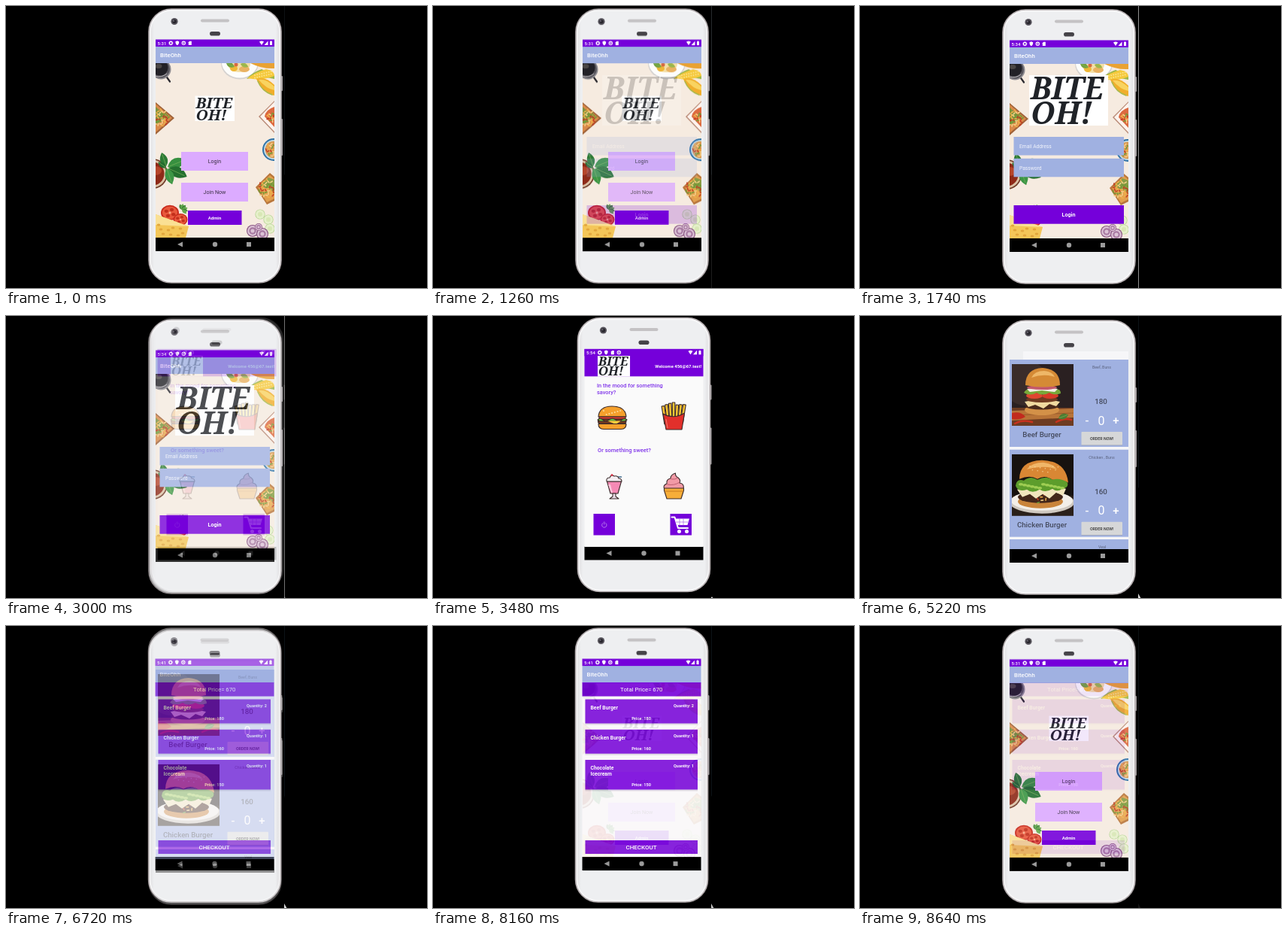
An HTML page that plays this animation: 560 by 375 pixels, repeating every 8.7 s.

```html
<!DOCTYPE html>
<html lang="en">
<head>
<meta charset="utf-8">
<title>Food ordering app</title>
<style>
  html, body { margin: 0; width: 100%; height: 100%; overflow: hidden; background: #000; }
  svg { display: block; width: 100vw; height: 100vh; }
  text { font-family: Roboto, sans-serif; white-space: pre; }
  .logo { font-family: "Noto Serif", serif; font-style: italic; font-weight: 700; }
</style>
</head>
<body>
<svg id="stage" viewBox="0 0 560 375">
  <defs>
    <clipPath id="screen"><rect x="199" y="76" width="158" height="232"/></clipPath>
    <clipPath id="photo"><rect width="82" height="82"/></clipPath>
    <clipPath id="mark"><rect width="105" height="67"/></clipPath>
    <linearGradient id="body" x2="1">
      <stop offset="0" stop-color="#dddcde"/><stop offset=".04" stop-color="#eeeff1"/>
      <stop offset=".96" stop-color="#eeeff1"/><stop offset="1" stop-color="#dad8da"/>
    </linearGradient>
  </defs>
</svg>
<script>
const PURPLE = '#7500da', BLUE = '#a0b1e1', CREAM = '#f6ebe0', INK = '#3a2a2a';
const HOLD = 1200, STEP = 60, STEPS = 10, SLOT = HOLD + STEP * (STEPS - 1);

const rect = (x, y, w, h, fill, extra = '') =>
  `<rect x="${x}" y="${y}" width="${w}" height="${h}" fill="${fill}" ${extra}/>`;
const oval = (x, y, rx, ry, fill, extra = '') =>
  `<ellipse cx="${x}" cy="${y}" rx="${rx}" ry="${ry}" fill="${fill}" ${extra}/>`;
const dot = (x, y, r, fill, extra) => oval(x, y, r, r, fill, extra);
const path = (d, fill, extra = '') => `<path d="${d}" fill="${fill}" ${extra}/>`;
const line = (d, color, w = 1) =>
  path(d, 'none', `stroke="${color}" stroke-width="${w}" stroke-linecap="round" stroke-linejoin="round"`);
const text = (s, x, y, size, fill, weight = 400, anchor = 'start') =>
  `<text x="${x}" y="${y}" font-size="${size}" fill="${fill}" font-weight="${weight}" text-anchor="${anchor}">${s}</text>`;
const mid = (s, x, y, size, fill, weight) => text(s, x, y, size, fill, weight, 'middle');
const at = (x, y, inner, scale = 1, extra = '') =>
  `<g transform="translate(${x} ${y}) scale(${scale})" ${extra}>${inner}</g>`;
const range = (n, f) => Array.from({ length: n }, (_, i) => f(i)).join('');

function phone(dx, dy) {
  return at(dx, dy,
    rect(365, 93, 3, 20, '#aaa6a8', 'rx="1"') + rect(365, 150, 3, 49, '#aaa6a8', 'rx="1"') +
    rect(190, 4, 176, 364, 'url(#body)', 'rx="30" stroke="#b5aeb0" stroke-width="1.6"') +
    rect(192, 6, 172, 360, 'none', 'rx="28" stroke="#f9f9fa" stroke-width="1.4"') +
    dot(224, 20.5, 4.6, '#55525a') + dot(224, 20.5, 2.6, '#26242b') + dot(223, 19.8, 1, '#73717c') +
    rect(259, 17.5, 38, 4, '#c4c2c4', 'rx="2"') +
    rect(271, 34, 14, 5.6, '#454348', 'rx="2.8"') +
    rect(199, 308, 158, 18, '#000') +
    path('M235 313.5V320.5L228 317Z', '#9b9b9b') + dot(278, 317, 3.2, '#9b9b9b') +
    rect(320, 314, 6, 6, '#9b9b9b'));
}

function status(x, y, time, swap) {
  const shield = path('M-2.4 -2L0 -3L2.4 -2Q2.4 2 0 3Q-2.4 2 -2.4 -2Z', '#fff');
  const ring = dot(0, 0, 2.2, 'none', 'stroke="#fff" stroke-width="1.1"') + dot(0, 0, .9, '#fff');
  const card = path('M-2 -1L-.6 -2.6H2V2.6H-2Z', '#fff');
  const gear = dot(0, 0, 1.9, 'none', 'stroke="#fff" stroke-width="1.3"') +
    dot(0, 0, 2.7, 'none', 'stroke="#fff" stroke-width=".7" stroke-dasharray="1.1 1"');
  const icons = swap ? [gear, shield, card, ring] : [gear, shield, ring, card];
  return at(x, y, rect(0, 0, 158, 9.5, PURPLE) + text(time, 2.5, 7, 6, '#fff', 500) +
    icons.map((s, i) => at(20.3 + i * 8.5, 4.8, s)).join('') +
    path('M138 3Q141 1 144 3L141 7.5Z', '#fff') + path('M149.5 2V7.5H144.5Z', '#fff') +
    rect(152, 2.5, 3, 5, '#fff') + rect(152.8, 1.8, 1.4, 1, '#fff'));
}

const titleBar = (x, y) => rect(x, y, 158, 22.5, BLUE) + text('BiteOhh', x + 6, y + 14, 7.8, '#fff', 500);

const logo = (x, y, scale) => at(x, y, rect(0, 0, 105, 67, '#fff') +
  `<g clip-path="url(#mark)" fill="#202328" font-size="41">
    <text class="logo" x="2" y="32">BITE</text><text class="logo" x="2" y="64.5">OH!</text></g>`, scale);

const leaf = (x, y, angle, len, color) =>
  `<g transform="translate(${x} ${y}) rotate(${angle})">` +
  path(`M0 0Q${len * .45} ${-len * .55} ${len} 0Q${len * .45} ${len * .5} 0 0Z`, color) +
  line(`M1 0H${len * .85}`, '#7db45c', .6) + '</g>';

// Scattered strands over a plate: green, red and yellow crumbs on a fixed spiral.
const crumbs = (x, y, r, n) => range(n, i => {
  const a = i * 2.4, d = r * Math.sqrt((i + .5) / n);
  return `<g transform="translate(${x + d * Math.cos(a)} ${y + d * Math.sin(a)}) rotate(${i * 57})">` +
    rect(-2, -.7, 4.2, 1.5, ['#f2b04a', '#c23a20', '#6f9a35', '#f7d48a'][i % 4], 'rx=".7"') + '</g>';
});

function food(dy) {
  const tomato = (x, y, r) => oval(x, y, r, r * .85, '#c92a1c') + oval(x, y, r * .84, r * .7, '#e8583c') +
    range(4, i => oval(x + r * .45 * Math.cos(i * 1.57 + .5), y + r * .38 * Math.sin(i * 1.57 + .5), r * .22, r * .18, '#c22f1b')) +
    dot(x, y, r * .12, '#f6b08c');
  const slice = (x, y) => dot(x, y, 6.6, '#b5d392') + dot(x, y, 5.9, '#e6f0cb') + dot(x, y, 3, '#d8e7b5');
  const onion = (x, y, r) => dot(x, y, r, '#8a5583') +
    range(3, i => dot(x, y, r * (.86 - i * .27), i % 2 ? '#a87aa2' : '#dcc3d6'));
  return at(0, dy,
    rect(199, 76, 158, 232, CREAM) +
    // coffee
    line('M212 92L218 100.5', '#2b2a30', 2.2) + dot(206, 84, 13.5, '#8d8b90') + dot(205.5, 83.5, 12.3, '#55535a') +
    dot(205, 82, 10.5, '#222127') + oval(203, 80, 4.5, 3, '#4a4645') + line('M198 93Q207 96 214 90', '#bdbabd', 1) +
    // breakfast plate and corn
    oval(311, 76, 25, 21.5, '#d5d2d0') + oval(311, 75, 24, 20.5, '#fdfdfb') + oval(310, 77, 15, 11, '#f4dfa6') +
    oval(303, 83, 5, 4, '#eeb737') + oval(317, 84, 7, 4, '#e9b263') + leaf(293, 76, 25, 12, '#74a13e') +
    leaf(312, 77, 20, 11, '#a5b84b') + dot(306, 78, 2.5, '#d66b42') +
    path('M320 97Q328 88 340 84L357 92V97Q338 92 320 97Z', '#9cb649') +
    path('M321 96Q334 87 346 84Q357 86 357 93Q340 100 321 96Z', '#f5c93c') +
    path('M333 97Q345 93 357 105V119Q341 116 333 97Z', '#f0ae2c') + path('M336 98Q345 96 357 107V112Q346 110 336 98Z', '#f9d360') +
    range(16, i => dot(331 + i % 8 * 3.1, 92 + (i / 8 | 0) * 3.4 - i % 8 * .7, 1, '#fbe28a')) +
    path('M325 76H357V83Q341 84 325 76Z', '#e9a233') + line('M335 100Q340 113 354 118', '#a8ba4e', 1.5) +
    // noodle boxes
    path('M199 128L224 149L199 171Z', '#a0633a') + path('M199 130L221 149L199 168Z', '#d98a4a') +
    path('M199 134L215 148L199 157Z', '#7f9440') + crumbs(206, 149, 11, 38) +
    path('M357 126L336 147L357 169Z', '#b98a76') + path('M357 127.5L338 147L357 167Z', '#fdf4ee') +
    path('M357 134Q345 138 344 147L357 161Z', '#dc6a40') + crumbs(353, 148, 6, 14) +
    path('M351 222L332 241L347 264L357 259V227Z', '#b9773c') + path('M351 225L335 241L347 261L357 256V230Z', '#e2a04e') +
    path('M349 228L338 239L357 247V231Z', '#8a9c45') + crumbs(347, 243, 12, 38) +
    // bowl
    dot(356, 191, 15, '#2f73a8') + dot(356, 191, 13, '#c4dce4') + dot(356, 191, 11.2, '#d99a55') + crumbs(354, 191, 9, 22) +
    // sauce and basil
    dot(195, 223, 20, '#6f3b28') + dot(195, 223, 18.4, '#dcc2a6') + dot(195, 223, 15.5, '#8e2a18') + oval(199, 219, 8, 6, '#b5452a') +
    line('M212 216L221 236', '#4f8a35', 1.2) + leaf(213, 213, -108, 19, '#2c7a35') + leaf(213, 215, -145, 13, '#236a2d') +
    leaf(215, 214, -22, 26, '#379040') + leaf(216, 216, 24, 27, '#24702f') + leaf(214, 216, 72, 22, '#3c9645') +
    // tomatoes and cheese
    range(6, i => leaf(234, 271, -110 + i * 30, 8, i % 2 ? '#5fa648' : '#387f35')) +
    tomato(218, 275, 12) + tomato(232, 284, 9.5) +
    path('M199 277L243 293L239 308H199Z', '#f4c658') + path('M199 277L243 293L199 291Z', '#fae094') +
    range(9, i => oval(203 + i * 13 % 36, 291 + i * 7 % 15, 2.3, 1.6, '#e2a63c')) +
    // cucumber and onion
    slice(338, 277) + slice(349, 284) + slice(351, 296) +
    onion(328, 299, 8) + onion(341, 303, 8) + onion(336, 294, 5),
    1, 'clip-path="url(#screen)"');
}

const edge = (y2, color) => line(`M370.5 0V${y2}`, color, .8);
const cursor = path('M370 369V375H373.5L372.5 373.5Z', '#ddd');

function home() {
  const button = (y, label) => rect(233, y, 89, 25, '#dcabff') + mid(label, 277.5, y + 15.2, 7.1, '#3b3044');
  return edge(224, '#11161a') + phone(0, 0) + status(199, 44.5, '5:31') + titleBar(199, 54) + food(0) +
    logo(251.5, 119.5, .5) + button(194, 'Login') + button(235, 'Join Now') +
    rect(242, 272, 71.5, 19, PURPLE) + mid('Admin', 277.5, 283.8, 6, '#fff', 700);
}

function login() {
  const field = (y, label) => rect(204.5, y, 146.5, 24.5, BLUE) + text(label, 212, y + 15, 6.7, '#f2f4fc');
  return edge(375, '#b5b5b5') + phone(0, 1) + status(199, 45.5, '5:34') + titleBar(199, 55) + food(1) +
    logo(225, 92, 1) + field(174, 'Email Address') + field(202.8, 'Password') +
    rect(204.5, 265, 146.5, 24.7, PURPLE) + mid('Login', 277.5, 280, 7.2, '#fff', 700);
}

function menu() {
  const ol = `stroke="${INK}" stroke-width="1.1" stroke-linejoin="round"`;
  const burger = path('M220 134Q221 120 238 120Q256 120 257 134Z', '#f5a02c', ol) +
    range(7, i => oval(227 + i * 3.7, 126 + i * 5 % 6, 1.1, .7, '#fff0c4')) +
    rect(219.5, 137, 37.5, 6, '#7a3b1e', `rx="3" ${ol}`) + rect(221, 134, 35, 3, '#e23b2e', ol) +
    path('M219 138Q222 134.5 226 138Q230 141.5 234 138Q239 134.5 243 138Q247 141.5 251 138Q255 135 258 138L255 140H222Z', '#6dbb3f', ol) +
    path('M232 139.5H250L243 144Z', '#ffcf3d') +
    path('M220 143.5H257Q257 150.5 250 150.5H227Q220 150.5 220 143.5Z', '#f5a02c', ol);
  const fries = range(7, i => `<g transform="rotate(${-9 + i * 3} 320 150)">` +
      rect(309 + i * 3.1, 118 - i * 5 % 4, 3.5, 24, '#ffc933', ol) + '</g>') +
    path('M306 130Q320 138 334.5 129L331 151H310Z', '#e2302b', ol) + path('M310 137L312 149', 'none', 'stroke="#f47c70"');
  const shake = line('M242 217L245 214H250.5', '#3f6b8d', 1.6) +
    path('M231.5 220H250.5L246 236H236Z', '#f58ab5', ol) + path('M233 224H236L239 235H237Z', '#fbc4d9') +
    path('M231 220Q230 215 235 215Q237 210 241 213Q246 212 247 216Q251 216 251 220Z', '#f3eef2', ol) +
    dot(238, 211.5, 1.5, '#d93a4e') + path('M239 236H243V240L247 243H235L239 240Z', '#e8dce6', ol);
  const sundae = path('M308 231Q305 225 311 223Q310 217 316 216Q316 211 322.5 209Q322 213 326 215Q330 218 328 222Q335 223 333 231Z', '#f29aa6', ol) +
    line('M312 224Q321 226 328 221M317 217Q322 218 326 215', '#b9586a', .9) +
    path('M307.5 229H333.5V232L330 243H311L307.5 232Z', '#f7ae39', ol) + line('M309 233H332', '#c97a1f');
  const cart = line('M317.5 267.5H321.5L326 282H339', '#fff', 2) + path('M322.5 269.5H341L338.5 278H325.5Z', '#fff') +
    line('M328 270V278M333 270V278M323.5 274H341', '#a660e8', .7) + dot(327.5, 286.5, 2.5, '#fff') + dot(337.5, 286.5, 2.5, '#fff');
  return phone(2.5, -1.5) + rect(201.5, 44, 158, 263, '#fafafa') + rect(201.5, 44, 158, 36.3, PURPLE) +
    status(201.5, 43.8, '5:54', true) + logo(219, 53, .41) +
    text('Welcome 456@67.test!', 357, 69, 5.9, '#fff', 700, 'end') +
    text('In the mood for something', 218, 94.5, 7.4, '#8137ea', 500) + text('savory?', 218, 103.5, 7.4, '#8137ea', 500) +
    text('Or something sweet?', 219, 181.3, 7.5, '#8137ea', 500) + burger + fries + shake + sundae +
    rect(213.5, 263, 28.5, 28.5, PURPLE) + line('M226 275.3A3.2 3.2 0 1 0 229.6 275.3M227.8 273.8V277', '#c596f0', .8) +
    rect(315.5, 263, 28.5, 28.5, PURPLE) + cart + dot(371, 374.5, 1, '#ddd');
}

// Both pictures live in an 82 by 82 box.
const beefPic = rect(0, 0, 82, 82, '#2a2021') + oval(18, 25, 30, 30, '#3a2c2a') + rect(0, 58, 82, 24, '#6d3c22') +
  path('M0 62L82 59V71L0 75Z', '#b87438') + line('M0 68L82 65', '#8f5427', .8) +
  oval(40, 61, 23, 7, '#d39148') + oval(40, 56, 22, 4.5, '#4b2a1b') + path('M17 50Q40 44 64 50L59 56L50 53L42 59L31 54L22 57Z', '#f0d9a0') +
  oval(40, 47, 21, 4, '#713b22') + oval(30, 42, 11, 4, '#e04630') + oval(51, 42, 11, 4, '#d63a28') +
  path('M16 38Q20 31 28 35Q34 29 42 34Q51 29 57 34Q65 32 65 39Q56 42 50 38Q40 43 33 38Q24 43 16 38Z', '#78a83a') +
  path('M20 33Q40 28 61 33L57 37L40 35L24 37Z', '#f5ede4') + oval(40, 31, 20, 3, '#c4586b') +
  path('M18 28Q18 6 41 5Q64 7 64 28Q41 33 18 28Z', '#d58a35') + path('M26 18Q30 9 43 9Q54 10 57 17Q42 12 26 18Z', '#eeb768') +
  path('M0 65Q12 62 18 70Q10 75 0 73Z', '#c22a1d') + line('M4 79Q15 73 27 77M59 77Q70 71 79 74', '#c8321f', 2.5) + leaf(62, 72, -20, 14, '#4e7c32');
const chickenPic = rect(0, 0, 82, 82, '#17120f') + rect(0, 55, 82, 27, '#2a201a') +
  oval(40, 64, 43, 15, '#cfc8bf') + oval(40, 62, 41, 13, '#f3efe8') +
  oval(38, 63, 30, 9, '#c9843a') + oval(38, 57, 30, 8, '#43271a') + crumbs(37, 57, 9, 9) +
  path('M7 47Q38 38 72 46L68 55L59 51L50 59L41 53L32 59L24 53L14 57Z', '#f1e5bd') +
  path('M5 42Q6 32 16 35Q25 28 34 34Q46 28 54 34Q66 28 74 38Q76 45 67 46Q60 51 54 46Q45 52 37 47Q27 53 20 47Q8 51 5 42Z', '#5d9d2c') +
  range(12, i => oval(12 + i * 5, 40 + i * 7 % 6, 3, 1.8, '#9fce53')) +
  path('M10 33Q10 9 40 8Q72 9 75 38Q64 31 54 34Q44 27 34 33Q24 27 10 33Z', '#d98734') +
  path('M20 20Q27 11 42 11Q55 13 60 20Q42 14 20 20Z', '#f0b668') +
  range(12, i => oval(24 + i * 3.4, 16 + i * 5 % 9, .8, .5, '#f8e3b4'));

function list() {
  const card = (y, name, parts, price, pic) => rect(199, y, 158, 116, BLUE) +
    at(202, y + 6, pic, 1, 'clip-path="url(#photo)"') + mid(name, 242, y + 103.3, 9.7, '#454b5e', 500) +
    mid(parts, 321.5, y + 12.3, 5.3, '#5c6480') + mid(price, 320.5, y + 59, 9.8, '#454b5e', 500) +
    mid('-', 302, y + 86, 15, '#fff', 500) + mid('0', 321, y + 86.5, 16, '#fff') + mid('+', 340.5, y + 86, 15, '#fff', 500) +
    rect(294.5, y + 96, 54.5, 18, '#d6d7d8', 'rx="1"') + rect(294.5, y + 113.5, 54.5, .8, '#9aa2b8') +
    mid('ORDER NOW!', 321.7, y + 107, 5.3, '#333', 500);
  return edge(228, '#10191d') + phone(0, 2) + rect(199, 47, 158, 263, '#f6f6f8') + rect(199, 47, 18, 11, '#eeeff1') +
    card(58, 'Beef Burger', 'Beef, Buns', '180', beefPic) + card(177.7, 'Chicken Burger', 'Chicken , Buns', '160', chickenPic) +
    rect(199, 297, 158, 13, BLUE) + mid('Veal', 322, 309.3, 5.3, '#5c6480') + cursor;
}

function basket() {
  const item = (y, h, names, count, price) => rect(202.5, y + 1, 149.5, h + 1, '#ddd8e4') + rect(202.5, y, 149.5, h, '#7b0cdc') +
    names.map((s, i) => text(s, 209.5, y + 13.3 + i * 8, 6.8, '#fff', 700)).join('') +
    text('Quantity: ' + count, 347, y + 10, 5.5, '#fff', 700, 'end') + mid('Price: ' + price, 277, y + h - 5, 5.6, '#fff', 700);
  return edge(226, '#10191d') + phone(-.5, -1) + rect(198.5, 75, 158, 232, '#fbfafc') +
    status(198.5, 43.5, '5:41') + titleBar(198.5, 53) + rect(198.5, 75, 158, 18.5, PURPLE) +
    mid('Total Price= 670', 277.3, 87.2, 7.8, '#fff') +
    item(97.5, 32, ['Beef Burger'], 2, 180) + item(137.7, 32, ['Chicken Burger'], 1, 160) +
    item(178, 39.5, ['Chocolate', 'Icecream'], 1, 150) +
    rect(202.5, 285, 149.5, 18, '#7b0cdc') + mid('CHECKOUT', 277, 297.2, 8, '#fff', 500) + cursor;
}

// The first scene is repeated on top so that the last fade can close the loop.
const stage = document.getElementById('stage');
stage.insertAdjacentHTML('beforeend',
  [home, login, menu, list, basket, home].map(f => `<g class="scene">${rect(0, 0, 560, 375, '#000')}${f()}</g>`).join(''));
const scenes = [...stage.querySelectorAll('.scene')];

function draw(ms) {
  const t = ms % (SLOT * 5), now = Math.floor(t / SLOT), into = t - now * SLOT - HOLD;
  const mix = into < 0 ? 0 : (Math.floor(into / STEP) + 1) / STEPS;
  scenes.forEach((g, i) => {
    const alpha = i === now ? 1 : i === now + 1 ? mix : 0;
    g.setAttribute('display', alpha ? 'inline' : 'none');
    g.setAttribute('opacity', alpha);
  });
}

const start = performance.now();
function tick() {
  draw(performance.now() - start);
  requestAnimationFrame(tick);
}
tick();
</script>
</body>
</html>
```
